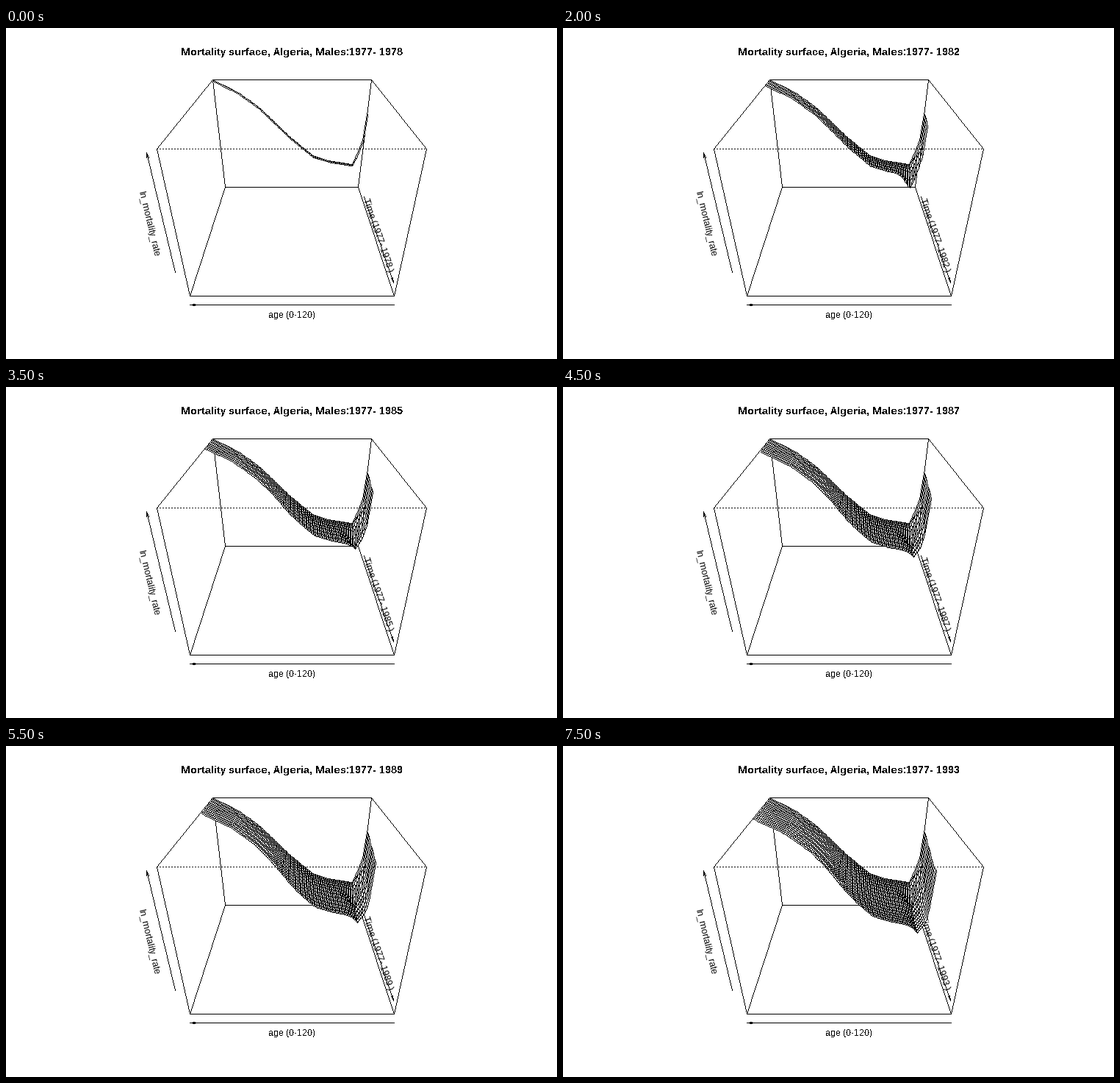
Animation, 750 px wide and 450 px high, one loop 8 s. Source, as a matplotlib script:

```python
import numpy as np
import matplotlib.pyplot as plt
from matplotlib.animation import FuncAnimation

W, H, DPI = 750, 450, 100
FIRST, SPAN, STEPS = 1977, 39, 16
BLACK, WHITE = (0, 0, 0, 255), (255, 255, 255, 255)

plt.rcParams.update({
    "font.family": "Liberation Sans",
    "text.hinting": "native",
    "text.hinting_factor": 1,
})


def level(age, year):
    """Surface height (0..1): log mortality by age, falling over the years."""
    start = np.interp(age, [0, 1, 8, 28, 42, 61, 86, 102, 120],
                      [.72, .48, .243, .28, .33, .505, .775, .903, 1])
    progress = 1 - np.exp(-((year - FIRST) / 8.3) ** 3)
    adults = .1 / (1 + np.exp((age - 66) / 6))
    children = .127 * age * np.exp(-age / 3)
    dip = .115 * np.exp(-((age - 8) / 7) ** 2 - ((year - 1982) / 1.5) ** 2)
    return start - progress * (.012 + adults + children) - dip


def project(x, t, z):
    """Box coordinates (x -1..1, depth t 0..1 towards the viewer, z 0..1) to pixels."""
    w = 1 - .1605 * z - .348 * t
    return 389 + 90.5 * x / w, (216 + 21.3 * t - 157.23 * z) / w, w


def stroke(a, b):
    """Pixels of a one-pixel line without smoothing."""
    a, b = np.floor(np.array([a, b]) + .5)
    n = int(max(abs(b - a).max(), 1))
    return np.floor(a + (b - a) * np.linspace(0, 1, n + 1)[:, None] + .5).astype(int)


def outline(*pts, closed=False):
    ends = pts[1:] + pts[:1] if closed else pts[1:]
    return np.concatenate([stroke(a, b) for a, b in zip(pts, ends)])


def blank():
    return np.zeros((H, W, 4), np.uint8)


def ink(img, px):
    img[px[:, 1], px[:, 0]] = BLACK


def fill(img, px):
    """Fill a convex outline with white, column by column."""
    xs, ys = px.T
    for x in range(xs.min(), xs.max() + 1):
        col = ys[xs == x]
        img[col.min():col.max() + 1, x] = WHITE


def build_facets():
    """(strip, outline) for every grid cell, farthest first."""
    age = np.arange(121)[None, :]
    year = FIRST + np.arange(STEPS + 1)[:, None]
    gx, gy, gw = project(1 - age / 60, (year - FIRST) / SPAN, level(age, year))
    cells = []
    for j in range(STEPS):
        for i in range(120):
            ring = [(j, i), (j, i + 1), (j + 1, i + 1), (j + 1, i)]
            depth = sum(gw[c] for c in ring)
            px = outline(*[(gx[c], gy[c]) for c in ring], closed=True)
            cells.append((depth, j, px))
    cells.sort(key=lambda c: -c[0])
    return [c[1:] for c in cells]


FACETS = build_facets()


def draw_surface(strips):
    img = blank()
    for strip, px in FACETS:
        if strip < strips:
            fill(img, px)
            ink(img, px)
    return img


def draw_arrow(img, start, end, head=7.2, spread=np.radians(10)):
    (x0, y0), (x1, y1) = start, end
    back = np.arctan2(y0 - y1, x0 - x1)
    ink(img, outline(start, end))
    wings = [(x1 + head * np.cos(back + s), y1 + head * np.sin(back + s))
             for s in (-spread, spread)]
    ink(img, outline(wings[0], end, wings[1]))


def draw_box():
    img = blank()
    back = [(281, 70), (497, 70), (479, 216), (298, 216)]
    front = [(205, 164), (572, 164), (528, 364), (250, 364)]
    ink(img, outline(*back, closed=True))
    ink(img, outline(front[1], front[2], front[3], front[0]))
    for a, b in zip(back, front):
        ink(img, outline(a, b))
    draw_arrow(img, (528, 376), (250, 376))
    draw_arrow(img, (230, 332), (191, 169))
    draw_arrow(img, (487, 229), (527, 346))
    return img


def draw_dots():
    img = blank()
    px = outline((205, 164), (572, 164))
    ink(img, px[np.arange(len(px)) % 4 < 2])
    return img


fig = plt.figure(figsize=(W / DPI, H / DPI), dpi=DPI, facecolor="white")
ax = fig.add_axes([0, 0, 1, 1])
ax.axis("off")


def layer(img, zorder):
    return ax.imshow(img, extent=(-.5, W - .5, H - .5, -.5), aspect="auto",
                     interpolation="nearest", zorder=zorder)


def label(x, y, text, size=12, angle=0, **kw):
    return ax.text(x, y, text, fontsize=size * 72 / DPI, rotation=angle, ha="center",
                   rotation_mode="anchor", zorder=1.5, antialiased=angle != 0, **kw)


layer(draw_box(), 1)
surface = layer(blank(), 2)
layer(draw_dots(), 3)

label(388.5, 393, "age (0-120)")
label(193.5, 265.5, "ln_mortality_rate", angle=-76.5, va="center")
time_label = label(505.5, 281.5, "", angle=-71.1, va="center")
title = label(389, 36, "", size=14, weight="bold")


def update(i):
    year = FIRST + 1 + i
    title.set_text(f"Mortality surface, Algeria, Males:{FIRST}- {year}")
    time_label.set_text(f"Time ({FIRST}- {year} )")
    surface.set_data(draw_surface(i + 1))
    return surface, title, time_label


anim = FuncAnimation(fig, update, frames=STEPS, interval=500, repeat=True,
                     repeat_delay=0, blit=False)
plt.show()
```
